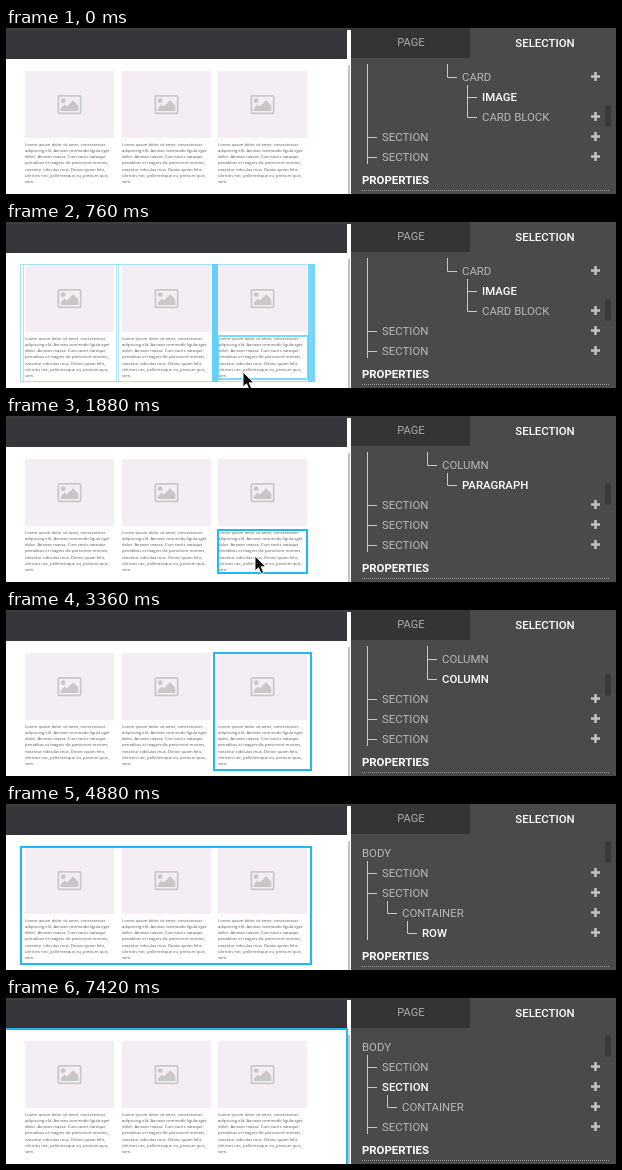
These frames come from a looping animation (610x166 px, 7.72 s). An HTML page:

```html
<!DOCTYPE html>
<html lang="en">
<head>
<meta charset="utf-8">
<title>Selecting parent elements</title>
<style>
html, body { margin: 0; width: 100%; height: 100%; overflow: hidden; background: #fff; }
svg { display: block; width: 610px; height: 166px; font-family: Roboto, Arial, sans-serif; font-size: 11.4px; }
.copy { font-family: "Open Sans", sans-serif; font-size: 4.15px; }
</style>
</head>
<body>
<svg id="stage" viewBox="0 0 610 166" xmlns="http://www.w3.org/2000/svg"></svg>
<script>
const LOOP = 7720;
const NS = 'http://www.w3.org/2000/svg';
const BLUE = '#1fbaf5';
const PALE = '#62d0f8';
const stage = document.getElementById('stage');

function add(parent, tag, attrs = {}, text) {
  const el = document.createElementNS(NS, tag);
  for (const key in attrs) el.setAttribute(key, attrs[key]);
  if (text) el.textContent = text;
  parent.appendChild(el);
  return el;
}
const rect = (parent, x, y, width, height, fill, more) =>
  add(parent, 'rect', { x, y, width, height, fill, ...more });
const label = (parent, x, y, text, fill, more) =>
  add(parent, 'text', { x, y, fill, ...more }, text);
const frame = (parent, x, y, w, h, stroke, line, more) =>
  rect(parent, x + line / 2, y + line / 2, w - line, h - line, 'none',
    { stroke, 'stroke-width': line, ...more });

const COPY = [
  'Lorem ipsum dolor sit amet, consectetuer',
  'adipiscing elit. Aenean commodo ligula eget',
  'dolor. Aenean massa. Cum sociis natoque',
  'penatibus et magnis dis parturient montes,',
  'nascetur ridiculus mus. Donec quam felis,',
  'ultricies nec, pellentesque eu, pretium quis,',
  'sem.'
];

function drawCard(x) {
  rect(stage, x, 43, 89, 67, '#f4eef4');
  const icon = add(stage, 'g', { transform: `translate(${x + 32.5} 67)`, fill: '#c8c7c8' });
  frame(icon, 0, 0, 24, 19.2, '#c8c7c8', 1.7, { rx: 1 });
  add(icon, 'circle', { cx: 5.7, cy: 5.7, r: 2.4 });
  add(icon, 'path', { d: 'M3.2 16V13.6L7.2 9.6L9.2 11.6L15.6 5.2L20.8 10.4V16Z' });
  COPY.forEach((line, i) => label(stage, x, 118 + i * 6.15, line, '#555', { class: 'copy' }));
}

// Page preview
rect(stage, 0, 0, 610, 166, '#fff');
rect(stage, 0, 0, 341, 31, '#363539');
rect(stage, 0, 0, 345, 2, '#3e3d41');
[19, 116, 212].forEach(drawCard);
rect(stage, 342, 37, 2, 129, '#c2c2c3');

// Hover guides
const hover = add(stage, 'g');
frame(hover, 14, 42, 294, 118, PALE, 1, { opacity: 0.6 });
[17, 110, 112].forEach(x => rect(hover, x, 42, 1, 118, PALE, { opacity: 0.5 }));
rect(hover, 206, 42, 6, 118, PALE);
rect(hover, 302, 42, 7, 118, PALE, { opacity: 0.85 });
frame(hover, 211, 113, 92, 45, PALE, 2, { opacity: 0.8 });
const sectionHover = add(stage, 'g');
rect(sectionHover, 0, 30, 341, 1, PALE);
rect(sectionHover, 340, 30, 1, 136, PALE);

const outline = add(stage, 'g');
const cursor = add(stage, 'path', {
  d: 'M0 0V15L3.5 11.8L6 17.6L8.7 16.4L6.2 10.8H10.8Z',
  fill: '#0b0b0b', stroke: '#fff', 'stroke-width': 0.9
});

// Side panel
rect(stage, 345, 0, 265, 166, '#4a4a4c');
rect(stage, 345, 0, 119, 30, '#343336');
label(stage, 405, 18, 'PAGE', '#aeaeb0', { 'text-anchor': 'middle', 'font-size': 11.1 });
label(stage, 539, 19, 'SELECTION', '#fff', { 'text-anchor': 'middle', 'font-weight': 500 });
label(stage, 356, 156, 'PROPERTIES', '#fff', { 'font-weight': 700 });
add(stage, 'path', { d: 'M356 162.5H603', stroke: '#98989a', 'stroke-dasharray': '1 1' });
const tree = add(stage, 'g');

const rowY = i => 49 + i * 20;

// item: [indent level, name, has plus]; branch: [level, top, rows it joins]
function drawTree({ items, picked, branches, trunk, thumb }) {
  tree.replaceChildren();
  rect(tree, 599, thumb, 6, 22, '#39393b', { rx: 3 });
  let d = `M361.5 ${trunk}V136`;
  for (const [level, top, rows] of branches) {
    const x = 341.5 + level * 20;
    if (level > 1) d += `M${x} ${top}V${rowY(rows[rows.length - 1]) + 0.5}`;
    for (const r of rows) d += `M${x} ${rowY(r) + 0.5}h9.5`;
  }
  add(tree, 'path', { d, fill: 'none', stroke: '#c9c9ca' });
  items.forEach(([level, name, plus], i) => {
    label(tree, 356 + level * 20, rowY(i) + 4, name, i === picked ? '#fff' : '#b9b9bb',
      i === picked ? { 'font-weight': 500 } : {});
    if (plus) add(tree, 'path', {
      d: `M585 ${rowY(i) - 0.5}h9M589.5 ${rowY(i) - 5}v9`, stroke: '#c3c3c4', 'stroke-width': 2.5
    });
  });
}

const SECTION = [1, 'SECTION', true];
const rowItems = [[0, 'BODY'], SECTION, SECTION, [2, 'CONTAINER', true], [3, 'ROW', true]];
const rowBranches = [[1, 57, [1, 2]], [2, 97, [3]], [3, 117, [4]]];
const rowBox = () => frame(outline, 14, 42, 292, 119, BLUE, 2);

const STATES = [
  { at: 0, trunk: 36, thumb: 77, picked: 1,
    items: [[5, 'CARD', true], [6, 'IMAGE'], [6, 'CARD BLOCK', true], SECTION, SECTION],
    branches: [[5, 36, [0]], [6, 57, [1, 2]], [1, 36, [3, 4]]] },
  { at: 1880, trunk: 36, thumb: 67, picked: 1,
    items: [[4, 'COLUMN'], [5, 'PARAGRAPH'], SECTION, SECTION, SECTION],
    branches: [[4, 36, [0]], [5, 57, [1]], [1, 36, [2, 3, 4]]],
    box: () => frame(outline, 211, 113, 91, 45, BLUE, 2) },
  { at: 3360, trunk: 36, thumb: 64, picked: 1,
    items: [[4, 'COLUMN'], [4, 'COLUMN'], SECTION, SECTION, SECTION],
    branches: [[4, 36, [0, 1]], [1, 36, [2, 3, 4]]],
    box: () => frame(outline, 207, 42, 99, 119, BLUE, 2) },
  { at: 4880, trunk: 57, thumb: 37, picked: 4, items: rowItems, branches: rowBranches, box: rowBox },
  { at: 6480, trunk: 57, thumb: 37, picked: 3, items: rowItems, branches: rowBranches, box: rowBox },
  { at: 7380, trunk: 57, thumb: 37, picked: 2,
    items: [[0, 'BODY'], SECTION, SECTION, [2, 'CONTAINER', true], SECTION],
    branches: [[1, 57, [1, 2, 4]], [2, 97, [3]]],
    box: () => {
      rect(outline, 0, 30, 342, 2, BLUE);
      rect(outline, 340, 30, 2, 136, BLUE);
    } }
];

// Pointer path: [time, x, y]
const PATH = [[460, 210, 165], [560, 226, 157], [740, 226, 157], [760, 237, 150], [840, 249, 140]];

function pointerAt(t) {
  const next = PATH.findIndex(p => p[0] > t);
  if (next < 0) return PATH[PATH.length - 1].slice(1);
  const [a, b] = [PATH[next - 1], PATH[next]];
  const k = (t - a[0]) / (b[0] - a[0]);
  return [a[1] + (b[1] - a[1]) * k, a[2] + (b[2] - a[2]) * k];
}

const show = (el, on) => el.setAttribute('visibility', on ? 'visible' : 'hidden');
let current = null;

function render(time) {
  const t = Math.floor((time % LOOP) / 20) * 20;
  const state = STATES.filter(s => s.at <= t).pop();
  if (state !== current) {
    current = state;
    outline.replaceChildren();
    if (state.box) state.box();
    drawTree(state);
  }
  const fade = Math.min(1, (t - 440) / 120);
  show(hover, t >= 460 && t < 1880);
  show(sectionHover, t >= 460 && t < 560);
  hover.setAttribute('opacity', Math.max(0, fade));
  const pointing = t >= 460 && t < 3360;
  show(cursor, pointing);
  if (pointing) cursor.setAttribute('transform', `translate(${pointerAt(t)})`);
}

const start = performance.now();
function tick() {
  render(performance.now() - start);
  requestAnimationFrame(tick);
}
tick();
</script>
</body>
</html>
```
